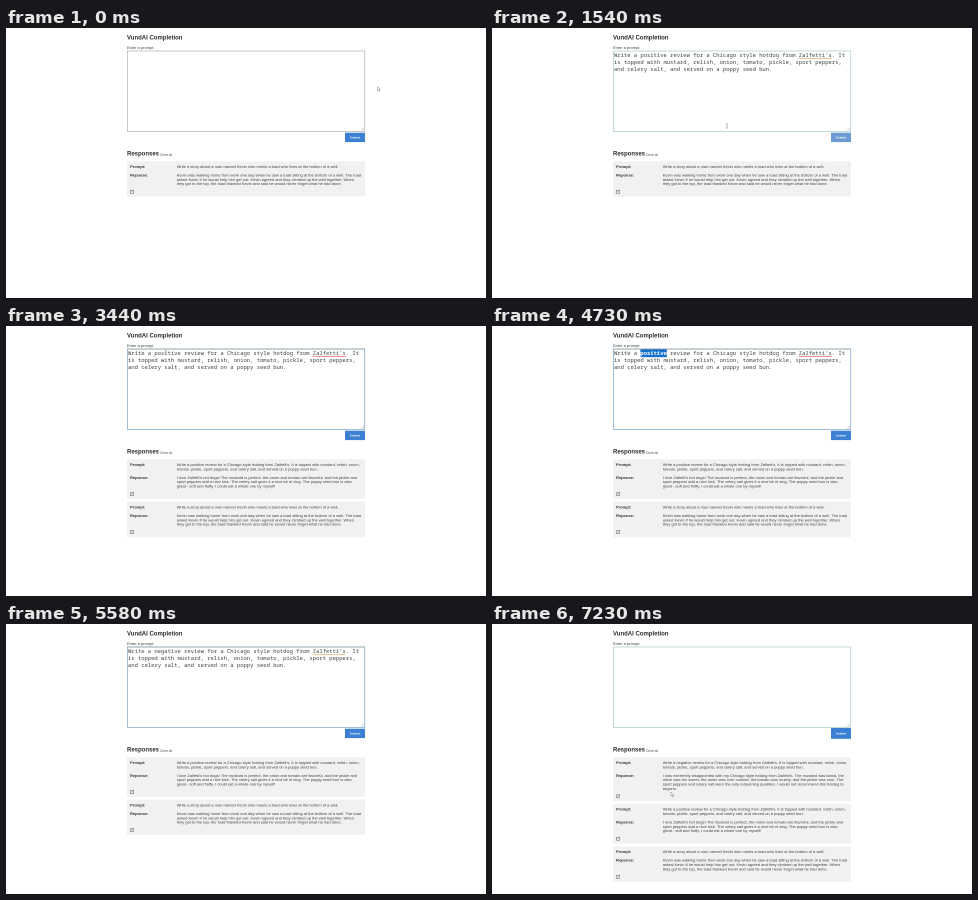
Animation, 480 px wide and 270 px high, one loop 7280 ms. Source, as an HTML page with a canvas:

```html
<!DOCTYPE html>
<html lang="en">
<head>
<meta charset="utf-8">
<title>Completion form</title>
<style>
  html, body { margin: 0; width: 100%; height: 100%; overflow: hidden; background: #fff; }
  canvas { display: block; width: 480px; height: 270px; }
</style>
</head>
<body>
<canvas id="stage" width="960" height="540"></canvas>
<script>
const ctx = document.getElementById('stage').getContext('2d');
const LOOP = 7280;
const SANS = '"Liberation Sans", Arial, sans-serif';
const MONO = '"Noto Sans Mono", monospace';
const CHAR = 3.3, COLUMNS = 71, LINE = 4.3;
const NAME = "Zalfetti's";

const promptFor = word => `Write a ${word} review for a Chicago style hotdog from ${NAME}. ` +
  'It is topped with mustard, relish, onion, tomato, pickle, sport peppers, ' +
  'and celery salt, and served on a poppy seed bun.';

const hotdogPrompt = word => [
  `Write a ${word} review for a Chicago style hotdog from ${NAME}. It is topped with mustard, relish, onion,`,
  'tomato, pickle, sport peppers, and celery salt, and served on a poppy seed bun.'
];

const story = {
  prompt: ['Write a story about a man named Kevin who meets a toad who lives at the bottom of a well.'],
  reply: [
    'Kevin was walking home from work one day when he saw a toad sitting at the bottom of a well. The toad',
    'asked Kevin if he would help him get out. Kevin agreed and they climbed up the well together. When',
    'they got to the top, the toad thanked Kevin and said he would never forget what he had done.'
  ]
};
const praise = {
  prompt: hotdogPrompt('positive'),
  reply: [
    `I love ${NAME} hot dogs! The mustard is perfect, the onion and tomato are flavorful, and the pickle and`,
    'sport peppers add a nice kick. The celery salt gives it a nice bit of zing. The poppy seed bun is also',
    'great - soft and fluffy. I could eat a whole one by myself!'
  ]
};
const complaint = {
  prompt: hotdogPrompt('negative'),
  reply: [
    `I was extremely disappointed with my Chicago style hotdog from ${NAME}. The mustard was bland, the`,
    'relish was too sweet, the onion was over cooked, the tomato was mushy, and the pickle was sour. The',
    'sport peppers and celery salt were the only redeeming qualities. I would not recommend this hotdog to',
    'anyone.'
  ]
};

// Pointer stops: time, x, y
const pointerPath = [
  [60, 371.5, 58.5], [180, 241, 49], [960, 241, 49], [1220, 347, 108], [1270, 347, 108],
  [1540, 235, 98], [1830, 235, 98], [2550, 125.5, 169.5], [2960, 125.5, 169.5],
  [3440, 160, 26.5], [3680, 149, 27], [3740, 149, 27], [4200, 172, 27], [4370, 172, 27],
  [4430, 175, 27], [5640, 347, 108], [6600, 347, 108], [7180, 179, 168]
];

const during = (t, a, b) => t >= a && t < b;
const progress = (t, a, b) => Math.min(1, Math.max(0, (t - a) / (b - a)));

function box(x, y, w, h, color) {
  ctx.fillStyle = color;
  ctx.fillRect(x, y, w, h);
}

function stroke(points, color, width) {
  ctx.beginPath();
  points.forEach(([x, y]) => ctx.lineTo(x, y));
  ctx.strokeStyle = color;
  ctx.lineWidth = width;
  ctx.stroke();
}

// Shaped at ten times the size so that advances are not rounded
function label(text, x, y, size, color = '#333', weight = '', family = SANS) {
  ctx.save();
  ctx.translate(x, y);
  ctx.scale(0.1, 0.1);
  ctx.font = `${weight} ${size * 10}px ${family}`;
  ctx.fillStyle = color;
  ctx.fillText(text, 0, 0);
  ctx.restore();
}

function wrap(text) {
  const lines = [''];
  for (const word of text.split(' ')) {
    const last = lines.length - 1;
    const joined = lines[last] ? lines[last] + ' ' + word : word;
    if (joined.length > COLUMNS) lines.push(word);
    else lines[last] = joined;
  }
  return lines;
}

function drawInput(t) {
  const focused = during(t, 530, 1270) || during(t, 2960, 5640);
  const fading = during(t, 1270, 1830) || t >= 5640;
  ctx.strokeStyle = focused ? '#86aed2' : fading ? '#b3d0d0' : '#bbb';
  ctx.lineWidth = 0.8;
  ctx.strokeRect(121.4, 23, 237.3, 80.4);
  if (focused) stroke([[121, 23], [359, 23]], '#8b9a9f', 0.8);
  stroke([[355.2, 102.4], [357.8, 99.8]], '#888', 0.4);
  stroke([[356.7, 102.4], [357.8, 101.3]], '#888', 0.4);

  let text = '';
  if (during(t, 530, 1830)) {
    const full = promptFor('positive');
    text = full.slice(0, Math.ceil(full.length * progress(t, 530, 960)));
  } else if (during(t, 2960, 4780)) {
    text = promptFor('positive');
  } else if (during(t, 4780, 6600)) {
    text = promptFor('negative'.slice(0, 1 + Math.floor(7 * progress(t, 4780, 5160))));
  }

  wrap(text).forEach((line, i) => {
    const y = 29.2 + i * 7;
    label(line, 122, y, 5.5, '#3e443e', '', MONO);
    const at = line.indexOf(NAME);
    if (at >= 0) {
      const color = during(t, 2960, 5160) ? '#e04a4a' : '#e2a04c';
      box(122 + at * CHAR, y + 1, NAME.length * CHAR, 0.6, color);
    }
  });

  if (during(t, 3740, 4780)) {
    const count = Math.round(7 * progress(t, 3740, 4200)) + (t >= 4400 ? 1 : 0);
    const x = 122 + 8 * CHAR;
    box(x, 23.4, count * CHAR, 7.8, '#1470cc');
    label('positive'.slice(0, count), x, 29.2, 5.5, '#fff', 'bold', MONO);
  }
}

function drawButton(t) {
  const waiting = during(t, 1270, 1830) || during(t, 5640, 6600);
  const tall = t >= 6060;
  box(339, tall ? 104 : 104.7, 20, tall ? 10.8 : 9.4, waiting ? '#6c9bd2' : '#3b80d3');
  label('Submit', 343.8, 110.5, 3.1, '#fff', 'bold');
}

function drawIcon(x, y) {
  const color = '#555';
  stroke([[x + 1.9, y + 0.5], [x + 0.3, y + 0.5], [x + 0.3, y + 3.6],
    [x + 3.3, y + 3.6], [x + 3.3, y + 2]], color, 0.5);
  stroke([[x + 1.5, y + 2.3], [x + 3.5, y + 0.3]], color, 0.5);
  stroke([[x + 2.3, y + 0.3], [x + 3.5, y + 0.3], [x + 3.5, y + 1.5]], color, 0.5);
}

function drawCards(cards) {
  let top = 133.3;
  for (const { prompt, reply } of cards) {
    const height = 18 + LINE * (prompt.length + reply.length);
    const promptY = top + 6.7;
    const replyY = promptY + LINE * (prompt.length + 1);
    box(121, top, 238, height, '#f1f1f1');
    label('Prompt:', 124, promptY, 4, '#333', 'bold');
    label('Reponse:', 124, replyY, 4, '#333', 'bold');
    prompt.forEach((line, i) => label(line, 170.7, promptY + i * LINE, 4, '#444'));
    reply.forEach((line, i) => label(line, 170.7, replyY + i * LINE, 4, '#444'));
    drawIcon(124.2, top + height - 6.8);
    top += height + 2.9;
  }
}

function pointerAt(t) {
  const next = pointerPath.findIndex(stop => stop[0] > t);
  if (next === 0) return pointerPath[0].slice(1);
  if (next < 0) return pointerPath[pointerPath.length - 1].slice(1);
  const [t0, x0, y0] = pointerPath[next - 1];
  const [t1, x1, y1] = pointerPath[next];
  const p = progress(t, t0, t1), k = p * p * (3 - 2 * p);
  return [x0 + (x1 - x0) * k, y0 + (y1 - y0) * k];
}

function drawPointer(t) {
  if (during(t, 530, 960) || during(t, 4730, 5640)) return;
  const [x, y] = pointerAt(t);
  const overInput = x > 121 && x < 359 && y > 23 && y < 103;
  if (overInput) {
    stroke([[x, y - 2], [x, y + 2]], '#777', 0.5);
    stroke([[x - 0.9, y - 2.1], [x + 0.9, y - 2.1]], '#777', 0.4);
    stroke([[x - 0.9, y + 2.1], [x + 0.9, y + 2.1]], '#777', 0.4);
    return;
  }
  const hand = during(t, 2500, 3000);
  const shape = hand
    ? [[0, 0], [0.9, 0], [0.9, 1.8], [3, 2.3], [2.7, 4.8], [0.6, 4.8], [-0.9, 2.8], [0, 2.7]]
    : [[0, 0], [0, 4.2], [1, 3.3], [1.7, 4.9], [2.4, 4.6], [1.7, 3.1], [3, 3]];
  ctx.beginPath();
  shape.forEach(([dx, dy]) => ctx.lineTo(x + dx, y + dy));
  ctx.closePath();
  ctx.fillStyle = '#fff';
  ctx.fill();
  ctx.strokeStyle = '#777';
  ctx.lineWidth = 0.45;
  ctx.stroke();
}

function draw(t) {
  ctx.setTransform(2, 0, 0, 2, 0, 0);
  box(0, 0, 480, 270, '#fff');
  label('VundAI Completion', 121, 11.6, 6, '#2c2c2c', 'bold');
  label('Enter a prompt', 121, 21.2, 4, '#444');
  drawInput(t);
  drawButton(t);
  label('Responses', 121, 127.3, 6, '#2c2c2c', 'bold');
  label('Clear all', 154, 127.8, 3.3, '#555');
  drawCards(t < 1830 ? [story] : t < 6600 ? [praise, story] : [complaint, praise, story]);
  drawPointer(t);
}

const start = performance.now();
function tick() {
  draw((performance.now() - start) % LOOP);
  requestAnimationFrame(tick);
}
tick();
</script>
</body>
</html>
```
